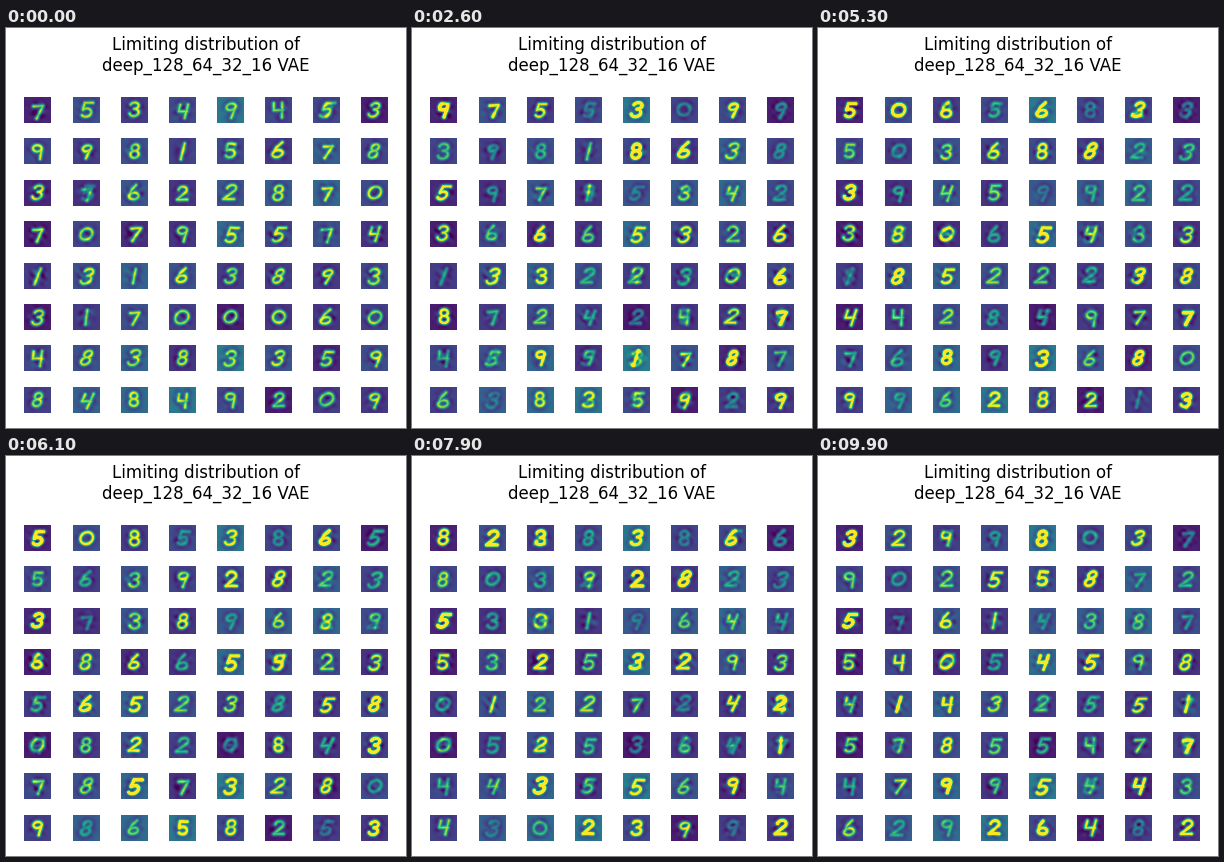
Recreate the animation shown at these times as a matplotlib script. Size 400 by 400 pixels, loop 10 s.

```python
import numpy as np
import matplotlib.pyplot as plt
from matplotlib.animation import FuncAnimation

FRAMES, STAGE, GRID = 100, 400, 8
WIDE, HIGH = 27, 26
COUNT = GRID * GRID
rng = np.random.default_rng(16)


def line(*pts):
    pts = np.array(pts, float)
    t = np.linspace(0, 1, 20)[:, None]
    return np.vstack([a + (b - a) * t for a, b in zip(pts, pts[1:])])


def arc(cx, cy, rx, ry, start=0, stop=360):
    a = np.radians(np.linspace(start, stop, 40))
    return np.column_stack([cx + rx * np.cos(a), cy + ry * np.sin(a)])


# Pen paths of the ten digits, y pointing down.
DIGITS = [
    [arc(0, 0, .72, .75)],
    [line((0, -.95), (0, .95))],
    [arc(0, -.45, .5, .45, 190, 390), line((.43, -.22), (-.55, .8), (.65, .8))],
    [arc(0, -.47, .5, .42, 200, 450), arc(0, .43, .55, .48, -90, 160)],
    [line((-.45, -.8), (-.5, .05), (.5, .05)), line((.5, -.85), (.35, .95))],
    [line((.6, -.82), (-.3, -.82), (-.4, -.1)), arc(0, .38, .55, .5, -135, 140)],
    [line((.1, -.95), (-.35, -.35), (-.5, .4)), arc(0, .42, .55, .42)],
    [line((-.55, -.55), (.5, -.6), (.1, .95))],
    [arc(0, -.45, .42, .42), arc(0, .42, .48, .46)],
    [arc(0, -.4, .5, .4), line((.48, -.4), (.3, .95))],
]
PATHS = [np.vstack(parts) for parts in DIGITS]
YY, XX = np.mgrid[:HIGH, :WIDE]
MID_X, MID_Y = (WIDE - 1) / 2, (HIGH - 1) / 2


def distance(digit, slant, size, shift):
    x, y = PATHS[digit].T
    px = MID_X + shift[0] + 9 * size * (x - slant * y)
    py = MID_Y + shift[1] + 8.3 * size * y
    gap = (XX[..., None] - px) ** 2 + (YY[..., None] - py) ** 2
    return np.sqrt(gap.min(axis=-1))


# Every tile has its own handwriting: bright strokes in a dark ring.
lean = rng.uniform(.05, .35, COUNT)
dist = np.array([
    [distance(d, slant + rng.normal(0, .05), rng.uniform(.88, 1),
              rng.normal(0, .4, 2)) for d in range(10)]
    for slant in lean
])
stroke = np.exp(-(dist / 1.95) ** 2)
ring = np.exp(-(dist / 4.8) ** 2) - stroke

# Markov chain: a digit mostly stays, else turns into one of similar shape.
likeness = np.corrcoef(stroke.mean(axis=0).reshape(10, -1))
jump = np.exp(5 * likeness)
np.fill_diagonal(jump, 0)
jump /= jump.sum(axis=1, keepdims=True)

stay = rng.uniform(.84, .98, COUNT)
chain = np.empty((FRAMES, COUNT), int)
chain[0] = rng.integers(0, 10, COUNT)
for f in range(1, FRAMES):
    for i, digit in enumerate(chain[f - 1]):
        moves = rng.random() > stay[i]
        chain[f, i] = rng.choice(10, p=jump[digit]) if moves else digit

# Short crossfades, so that two digits overlap for a moment.
FADE = np.array([1, 2, 3, 2, 1]) / 9
reach = len(FADE) // 2
padded = np.eye(10)[np.pad(chain, ((reach, reach), (0, 0)), mode="edge")]
mix = sum(w * padded[k:k + FRAMES] for k, w in enumerate(FADE))

# Smooth blotches that fade towards the tile edge.
BLOTS = 14
window = np.exp(-(((XX - MID_X) ** 2 + (YY - MID_Y) ** 2) / 95) ** 1.5)
freq = rng.uniform(-.75, .75, (2, BLOTS, 1, 1))
phase = rng.uniform(0, 2 * np.pi, (BLOTS, 1, 1))
blots = window * np.sin(freq[0] * XX + freq[1] * YY + phase)
base = rng.normal(0, 1, (COUNT, BLOTS))
drift = rng.uniform(0, 2 * np.pi, (COUNT, BLOTS))
speed = rng.uniform(.2, .7, (COUNT, BLOTS))

shade = np.clip(rng.normal(.22, .09, COUNT), .08, .42)
first = rng.uniform(.85, 1, COUNT)
strength = rng.uniform(.5, 1.55, COUNT)


def column(v):
    return v[:, None, None]


def tiles(frame):
    ink = np.einsum("td,tdyx->tyx", mix[frame], stroke)
    dark = np.einsum("td,tdyx->tyx", mix[frame], ring)
    pulse = 1 + .18 * np.sin(drift[:, 0] + .5 * speed[:, 0] * frame)
    top = first + (strength * pulse - first) * min(frame / 8, 1)
    noise = np.tensordot(base + .7 * np.sin(drift + speed * frame), blots, 1)
    low = column(shade)
    return (low + column(top - shade) * ink - .65 * low * dark
            + column(.015 + .01 * top) * noise)


LEFT = np.rint(18.49 + 48.1 * np.arange(GRID)).astype(int)
TOP = np.rint(69 + 41.4 * np.arange(GRID)).astype(int)


def compose(frame):
    canvas = np.full((STAGE, STAGE), np.nan)
    for i, tile in enumerate(tiles(frame)):
        y, x = TOP[i // GRID], LEFT[i % GRID]
        canvas[y:y + HIGH, x:x + WIDE] = tile
    return np.ma.masked_invalid(canvas)


fig = plt.figure(figsize=(4, 4), dpi=100, facecolor="white")
ax = fig.add_axes([0, 0, 1, 1])
ax.axis("off")
image = ax.imshow(compose(0), cmap="viridis", vmin=0, vmax=1,
                  interpolation="nearest", aspect="auto")
fig.suptitle("Limiting distribution of\ndeep_128_64_32_16 VAE",
             fontsize=12, family="DejaVu Sans")


def update(frame):
    image.set_data(compose(frame))
    return [image]


anim = FuncAnimation(fig, update, frames=FRAMES, interval=100, repeat=True)
plt.show()
```
